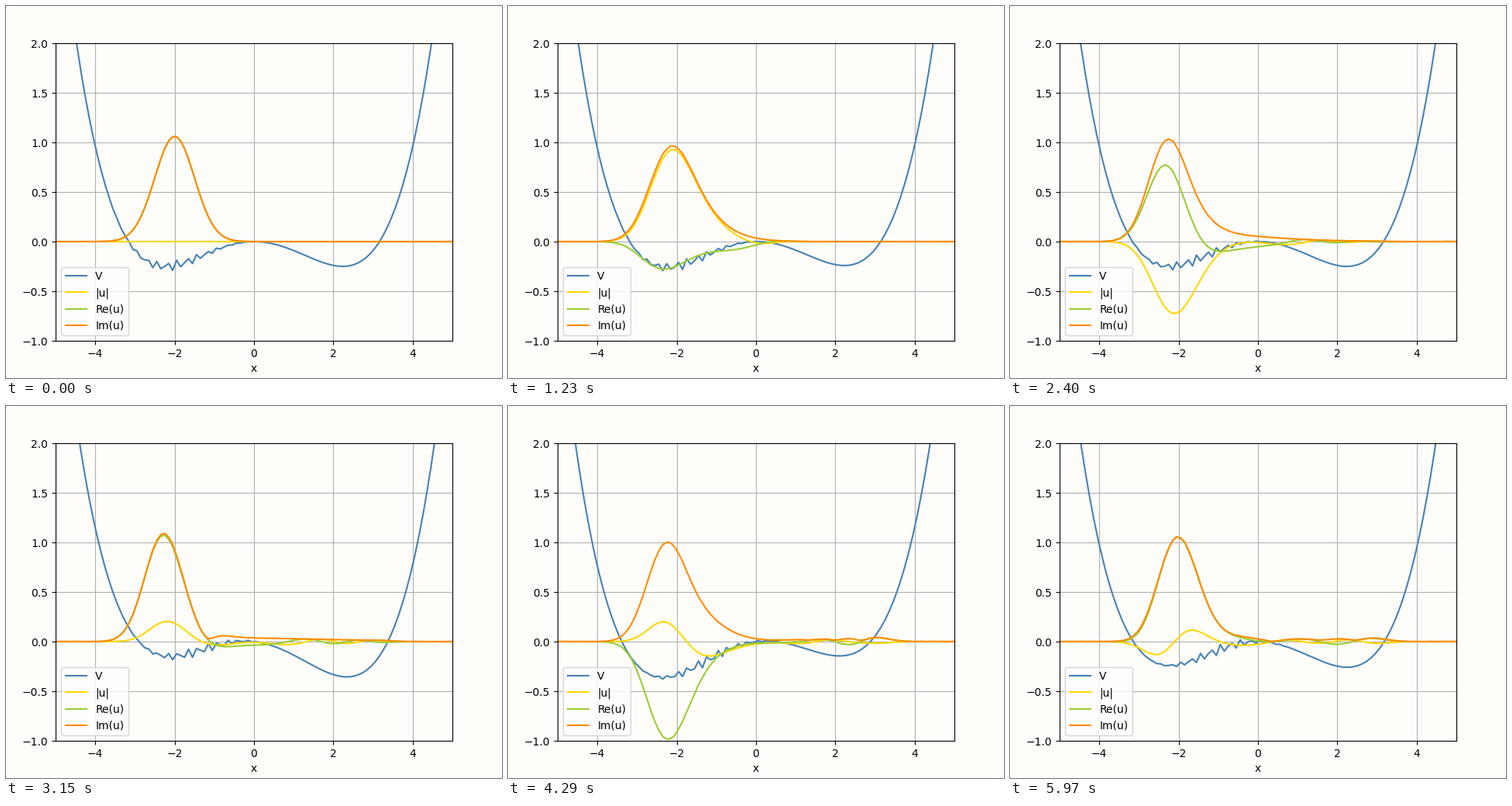
A matplotlib script for the animation above (6 s loop, 640 px wide and 480 px high).

```python
import numpy as np
import matplotlib.pyplot as plt
from matplotlib.animation import FuncAnimation

FRAMES, INTERVAL = 200, 30
SUBSTEPS = 20
STRENGTH = 68.5        # potential strength in i u_t = -u_xx + STRENGTH * V u
DT = 0.005             # time per frame

N, DX = 200, 0.1
x = (np.arange(N) - (N - 1) / 2) * DX
k = 2 * np.pi * np.fft.fftfreq(N, DX)


def potential(t):
    """Double well, rocked sideways, with a short travelling ripple."""
    s = x + 2 - t
    well = x**4 / 100 - x**2 / 10
    tilt = -0.05 * np.sin(5 * np.pi * t) * x
    ripple = 0.05 * np.sin(8 * np.pi * s) * np.exp(-s**2)
    return well + tilt + ripple


def evolve():
    """Split-step solution, one row per frame."""
    h = DT / SUBSTEPS
    kinetic = np.exp(-1j * k**2 * h)
    u = (4 / np.pi) ** 0.25 * np.exp(-2 * (x + 2) ** 2) + 0j
    rows = [u]
    for n in range(FRAMES - 1):
        for j in range(SUBSTEPS):
            v = potential(n * DT + (j + 0.5) * h)
            half = np.exp(-0.5j * STRENGTH * v * h)
            u = half * np.fft.ifft(kinetic * np.fft.fft(half * u))
        rows.append(u)
    return np.array(rows)


waves = evolve()

BACK = "#fffdfa"
fig = plt.figure(figsize=(6.4, 4.8), dpi=100, facecolor=BACK)
ax = fig.add_axes([0.1, 0.1, 0.8, 0.8], facecolor=BACK)
ax.set_xlim(-5, 5)
ax.set_ylim(-1, 2)
ax.set_xlabel("x")
ax.grid(True)

styles = [("V", "steelblue"), ("|u|", "gold"),
          ("Re(u)", "yellowgreen"), ("Im(u)", "darkorange")]
lines = [ax.plot([], [], color=c, label=name)[0] for name, c in styles]
ax.legend(loc="lower left")


def update(n):
    u = waves[n]
    for line, y in zip(lines, (potential(n * DT), u.imag, u.real, np.abs(u))):
        line.set_data(x, y)
    return lines


anim = FuncAnimation(fig, update, frames=FRAMES, interval=INTERVAL,
                     repeat=True, repeat_delay=0, blit=False)
plt.show()
```
